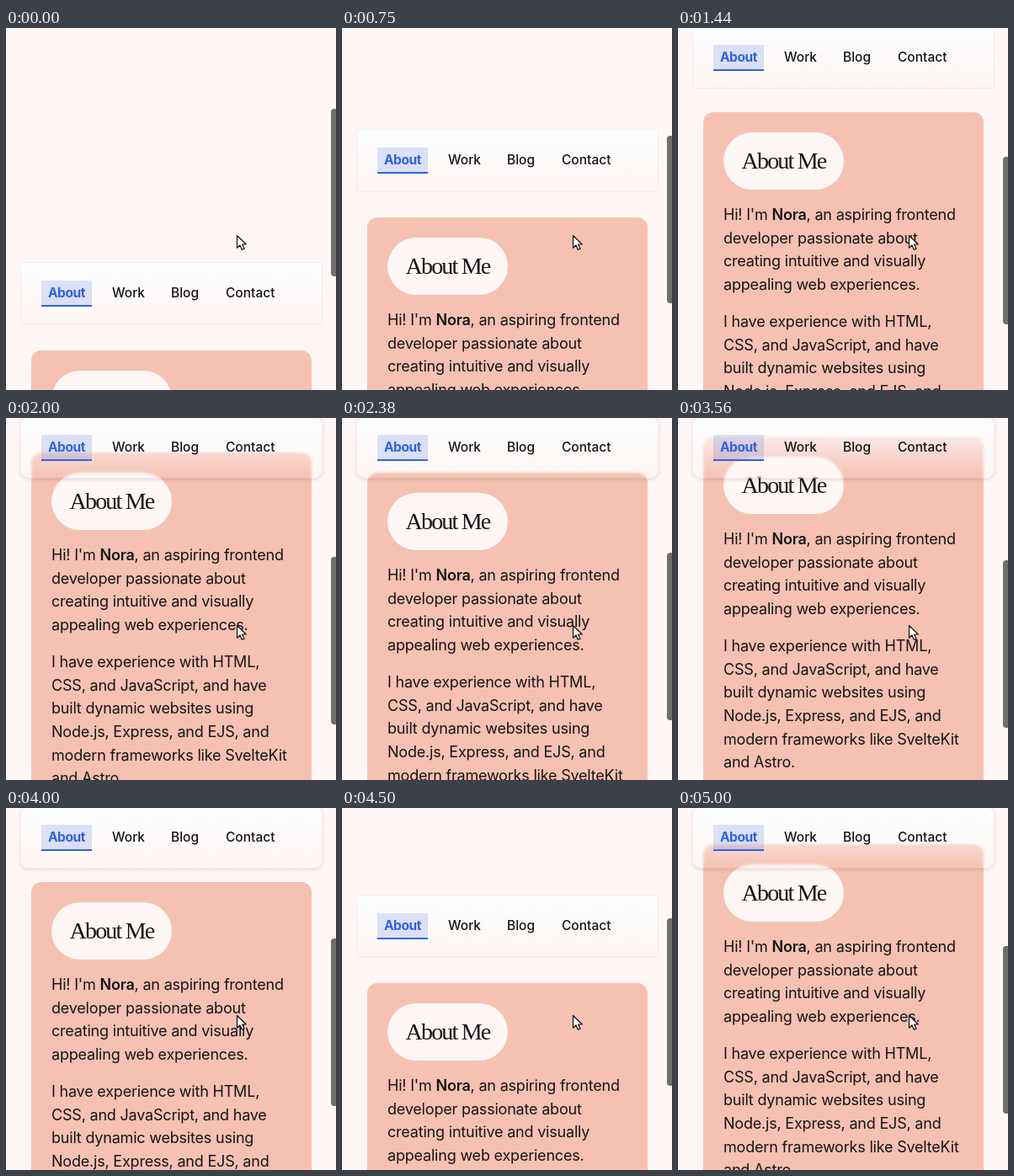
These frames come from a looping animation (392 by 430 pixels, 5060 ms). An HTML page:

```html
<!DOCTYPE html>
<html lang="en">
<head>
<meta charset="utf-8">
<title>Sticky navigation</title>
<style>
html, body { margin: 0; width: 100%; height: 100%; overflow: hidden; background: #fff7f5; }
body { position: relative; font-family: Inter, sans-serif; color: #151515; }
.card, nav, .thumb, .cursor { position: absolute; top: 0; will-change: transform; }
.card { left: 30px; width: 333px; height: 640px; border-radius: 12px; background: #f6c1b2; }
h1 {
  position: absolute; left: 24px; top: 24px; width: 143px; height: 68px; margin: 0;
  border-radius: 34px; background: #fff7f5; text-align: center; white-space: nowrap;
  font: 400 28px/67px "Liberation Serif", serif; letter-spacing: -1.8px;
}
p {
  position: absolute; left: 24px; margin: 0; white-space: nowrap;
  font-size: 18px; line-height: 27.67px; letter-spacing: -.2px;
}
b { font-weight: 600; }
nav {
  --stuck: 0;
  left: 17px; width: 359px; height: 74px; box-sizing: border-box;
  border: 1px solid rgba(60, 30, 20, .06);
  border-radius: calc(2px + 8px * var(--stuck));
  background: linear-gradient(#fcfdff, rgba(252, 253, 255, 0)) border-box;
  box-shadow: 0 1px 4px rgba(60, 30, 30, calc(.16 * var(--stuck)));
  backdrop-filter: blur(1.5px);
}
nav span { position: absolute; top: 21px; font: 500 15.5px/29px Inter, sans-serif; }
nav .active {
  left: 24px; width: 60px; text-align: center; font-weight: 700; letter-spacing: -.4px;
  color: #2f62e2; background: rgba(47, 98, 226, .17); border-bottom: 2px solid #2f62e2;
}
.thumb { left: 386px; width: 10px; height: 199px; border-radius: 4px; background: #6e6e6e; }
.cursor { left: 272px; top: 244px; }
</style>
</head>
<body>
<section class="card">
  <h1>About Me</h1>
  <p style="top:108px">Hi! I'm <b>Nora</b>, an aspiring frontend<br>developer passionate about<br>creating intuitive and visually<br>appealing web experiences.</p>
  <p style="top:235px">I have experience with HTML,<br>CSS, and JavaScript, and have<br>built dynamic websites using<br>Node.js, Express, and EJS, and<br>modern frameworks like SvelteKit<br>and Astro.</p>
</section>
<nav>
  <span class="active">About</span>
  <span style="left:108px">Work</span>
  <span style="left:178px">Blog</span>
  <span style="left:243px">Contact</span>
</nav>
<div class="thumb"></div>
<svg class="cursor" width="16" height="22">
  <path d="M2.5 2.5V17.2L6 14 8.3 19.3 11 18.2 8.7 13H13.2Z" fill="#fff" stroke="#111" stroke-width="1.2" stroke-linejoin="round"/>
</svg>
<script>
const LOOP = 5060, STEP = LOOP / 81;
const NAV_GAP = 105, NAV_MIN = -2;

// [time in ms, top of the card in px]
const keys = [
  [0, 383], [1440, 100], [2000, 41], [2220, 34], [2810, 235], [2870, 239],
  [3560, 22], [3630, 21], [4500, 208], [4560, 210], [5000, 42], [LOOP, 28]
];
const slopes = keys.slice(1).map(([t, y], i) => (y - keys[i][1]) / (t - keys[i][0]));
const tangents = keys.map((_, i) => {
  const a = slopes[i - 1] ?? slopes[i], b = slopes[i] ?? a;
  return a * b > 0 ? 2 * a * b / (a + b) : 0;
});

// Monotone cubic through the keys
function cardTop(t) {
  const i = Math.max(0, keys.findIndex(k => k[0] > t) - 1);
  const [t0, y0] = keys[i], [t1, y1] = keys[i + 1];
  const h = t1 - t0, u = (t - t0) / h, v = 1 - u;
  return y0 * (1 + 2 * u) * v * v + y1 * u * u * (3 - 2 * u)
    + h * u * v * (tangents[i] * v - tangents[i + 1] * u);
}

const card = document.querySelector('.card');
const nav = document.querySelector('nav');
const thumb = document.querySelector('.thumb');
const moveY = (el, y) => { el.style.transform = `translateY(${y}px)`; };

const start = performance.now();
function draw(now) {
  const time = Math.max(0, now - start) % LOOP;
  const y = Math.round(cardTop(Math.min(80, Math.floor((time + 3) / STEP)) * STEP));
  moveY(card, y);
  moveY(nav, Math.max(NAV_MIN, y - NAV_GAP));
  moveY(thumb, Math.round(96 + (383 - y) * .2014));
  nav.style.setProperty('--stuck', Math.min(1, Math.max(0, (98 - y) / 12)));
  requestAnimationFrame(draw);
}
draw(start);
</script>
</body>
</html>
```
